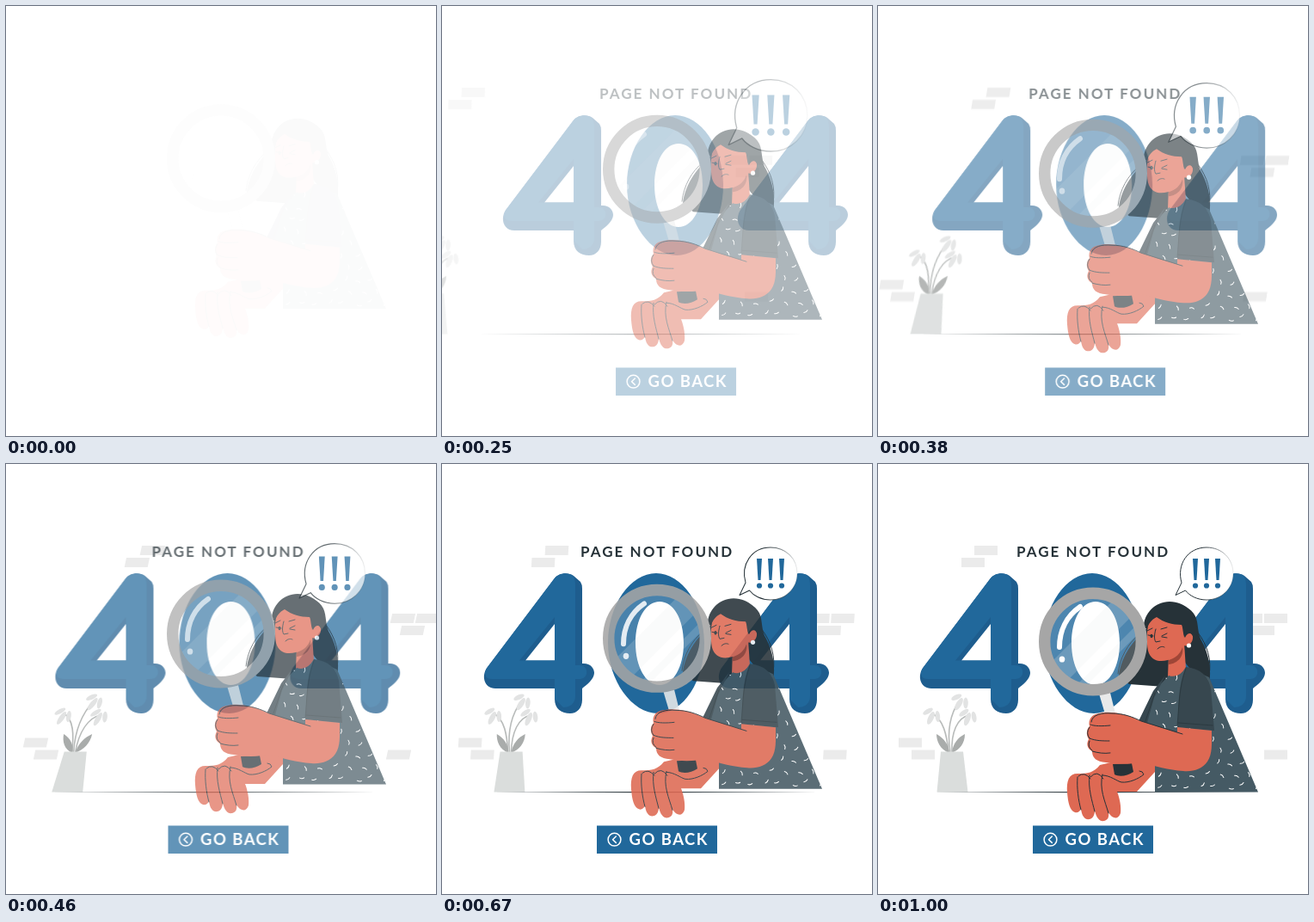
Recreate the animation shown at these times as an HTML page. Size 500 by 500 pixels, loop 1.04 s.

```html
<!DOCTYPE html>
<html lang="en">
<head>
<meta charset="utf-8">
<title>Page not found</title>
<style>
  html, body { margin: 0; width: 100%; height: 100%; overflow: hidden; background: #fff; }
  svg { display: block; width: 100%; height: 100%; }
  text { font-family: Lato, "Open Sans", sans-serif; font-weight: 700; }
  .line { fill: none; stroke: #263238; stroke-width: 1; stroke-linecap: round; stroke-linejoin: round; }
  .skin { fill: #de6953; }
  .hair { fill: #263238; }
  .white { fill: none; stroke: #fff; stroke-linecap: round; stroke-linejoin: round; }
</style>
</head>
<body>
<svg viewBox="0 0 500 500">
  <defs>
    <clipPath id="dressClip"><path d="M338 245L362 236L385 248L442 381.500H322V350L303 300L322 263Z"/></clipPath>
    <clipPath id="lensClip"><circle cx="250" cy="206.500" r="51"/></clipPath>
    <linearGradient id="bubbleLine"><stop offset=".45" stop-color="#263238"/><stop offset="1" stop-color="#263238" stop-opacity=".1"/></linearGradient>
    <g id="four">
      <path fill="#1e5d8e" fill-rule="evenodd" d="M131 261H62C49 261 45 246 53 236L130 134C136 126 147 126 153 130L161 137Q163 140 163 145V232C172 231 177 237 177 243C177 250 168 257 163 261V274C163 284 157 290 149 290C139 290 131 285 131 273ZM131 186L97 228.500H131Z"/>
      <path fill="#21689b" fill-rule="evenodd" d="M131 250H58C49 250 48 242 53 236L130 134C136 126 147 126 152 130Q155 134 155 141V234H160C171 234 171 250 160 250H155V270C155 279 148 283 141 283L131 273ZM131 178L90 228.500H131Z"/>
    </g>
    <g id="bloom">
      <ellipse cx="-5" cy="4" rx="2.800" ry="6.500" transform="rotate(35)"/>
      <ellipse cx="0" cy="6" rx="3.200" ry="8"/>
      <ellipse cx="5" cy="4" rx="2.800" ry="6.500" transform="rotate(-30)"/>
    </g>
  </defs>

  <g id="room">
    <g id="bricks" fill="#ebebeb"></g>
    <g fill="none" stroke="#b8bbba" stroke-width="1.600">
      <path d="M82 335C80 315 76 297 63 290"/>
      <path d="M84 335C80 310 84 290 95 275"/>
      <path d="M86 335C85 312 92 295 106 292"/>
    </g>
    <path fill="#a9acab" d="M83 336C72 332 68 322 68 314C77 319 82 326 83 336ZM86 336C87 325 93 318 101 314C101 325 95 332 86 336Z"/>
    <g fill="#e2e3e3">
      <use href="#bloom" transform="translate(64 290) rotate(25)"/>
      <use href="#bloom" transform="translate(97 274) rotate(30)"/>
      <use href="#bloom" transform="translate(106 291) rotate(20)"/>
    </g>
    <path fill="#dadddc" d="M73 334.500H99L104.500 381.500H68.500Z"/>
  </g>

  <path id="table" fill="#263238" d="M65 381.500L250 380.900L442 381.500L250 382.200Z"/>

  <g id="sign">
    <use href="#four"/>
    <use href="#four" x="273"/>
    <path fill="#21689b" fill-rule="evenodd" d="M249 127C279 127 305 164 305 208S281 290 251 290S193 252 193 208S219 127 249 127ZM253 160C237 160 225 180 225 208S237 257 253 257S281 236 281 208S269 160 253 160Z"/>
    <text x="161" y="108.300" font-size="17" letter-spacing="2.050" fill="#263238">PAGE NOT FOUND</text>
    <path fill="#21689b" d="M180 420.500H320V453H180Z"/>
    <circle cx="200.500" cy="436.700" r="7.400" class="white" stroke-width="1.500"/>
    <path d="M202.300 433L198.500 436.700L202.300 440.400" class="white" stroke-width="1.500"/>
    <text x="217.500" y="443.200" font-size="18.500" letter-spacing="1.450" fill="#fff">GO BACK</text>
  </g>

  <g id="woman">
    <path class="hair" d="M316 188C299 202 283 222 280 246L292 256L333 259L350 222L362 237L385 256C388 240 385 222 377 207C371 198 373 185 369 177C361 161 333 155 318 171C311 176 309 183 312 192Z"/>
    <path class="line" d="M304 198C290 209 281 226 279 244M372 196C383 211 388 227 385 246"/>

    <path class="skin" d="M338 220L356 208L358 238C352 249 344 251 337 248Z"/>
    <path fill="#9f4637" d="M338 228C346 226 352 220 354 213C356 223 349 232 338 233Z"/>
    <path class="skin" d="M316 180C312 192 312 206 314 217C317 228 326 231 337 228C346 225 352 217 355 211C365 214 369 200 364 197C360 194 357 198 356 202L354 182L326 176Z"/>
    <path class="hair" d="M309 190C309 174 322 160 339 160C358 160 369 174 371 190C372 199 369 204 367 204C366 195 360 195 357 202C354 197 355 191 353 187C342 187 332 184 324 178C318 181 314 186 313 192Z"/>
    <circle cx="361.500" cy="211" r="2.600" fill="#fff"/>
    <path class="line" d="M323 192C321 199 321 204 323 207L328 206M313 194L319 191M329 192L336 190M314 199L320 200M330 200L336 197M330 201L336 202M325 215C328 212 331 212 333 213"/>
    <ellipse cx="318" cy="200" rx="1.500" ry="2.300" class="hair"/>

    <path fill="#455a64" d="M338 246Q350 250 358 236L385 248L442 381.500H322V350L303 300L322 263Z"/>
    <g id="dashes" clip-path="url(#dressClip)" class="white" stroke-width="1"></g>
    <path fill="#37474f" d="M358 236C375 238 384 246 387 261L391 310L348 306C350 282 348 259 358 236ZM334 246L320 264L303 299L313 301L321 272Z"/>
    <path class="line" opacity=".6" d="M358 238C350 259 350 282 348 304M349 301L389 304M322 266L311 299"/>

    <path fill="#37474f" d="M272 346L294 342L297 357C296 363 277 366 275 360Z"/>
    <path class="skin" d="M258 350C251 359 244 360 232 360C222 360 219 368 220 382C221 394 223 403 229 405C232 406 235 404 236 401C237 410 241 414 246 413C250 412 252 408 252 403C254 412 258 416 263 415C267 414 269 411 268 405C273 414 280 413 282 406C283 399 281 388 278 381H301L322 358V337L284 344Z"/>
    <path fill="#263238" d="M273 349L295 348L297 358C290 363 280 364 275 361Z"/>
    <path class="line" d="M232 364C231 377 233 391 236 402M246 362C244 377 249 392 252 404M261 361C257 378 264 392 268 406M233 363Q240 357 247 366M247 364Q255 355 262 366M261 362C270 362 278 369 283 370C292 371 303 366 309 361Q308 357 304 357"/>

    <path fill="#e9eaea" d="M257 267L270 266L277 294H265Z"/>
    <g clip-path="url(#lensClip)">
      <circle cx="250" cy="206.500" r="51" fill="#fff" opacity=".2"/>
      <path fill="#e6e9ea" opacity=".2" d="M195 237L278 154L298 174L215 257ZM224 264L302 186L308 192L230 270Z"/>
    </g>
    <circle cx="250" cy="206.500" r="56.300" fill="none" stroke="#a6a6a6" stroke-width="13.400"/>
    <path class="white" stroke-width="6" d="M211 213C211 194 219 177 235 166"/>
    <ellipse cx="214" cy="227" rx="3.300" ry="3.600" fill="#fff"/>

    <path class="skin" d="M348 306L388 310C388 326 389 337 383 346C377 355 366 358 355 357C338 356 322 351 306 347C295 349 279 350 265 347C254 346 249 342 249 334C243 331 242 325 245 320C242 315 242 309 246 305C244 298 248 291 257 290C269 287 287 290 301 297C317 303 334 308 348 312Z"/>
    <path class="line" d="M247 303C251 305 261 305 270 304M246 319C253 322 261 322 269 322M249 334C256 336 263 337 270 336M248 300C249 291 261 289 272 290C285 290 296 294 306 299L354 314M246 306Q241 313 246 319M246 322Q243 329 249 333"/>
  </g>

  <g id="bubble">
    <path fill="#fff" stroke="url(#bubbleLine)" stroke-linejoin="round" d="M353 138C347 117 360 97 382 97C400 97 413 110 413 127.500C413 145 399 158 382 158C371 158 362 153 357.500 147L346 152.500Z"/>
    <g id="marks" fill="#21689b"></g>
  </g>
</svg>

<script>
  const LOOP = 1040, FRAME = 1000 / 24;
  const $ = id => document.getElementById(id);
  const repeat = (items, draw) => items.map(draw).join('');

  $('bricks').innerHTML = repeat(
    [[112, 95], [97, 109], [24, 318.500], [39, 332.500], [449, 332.500], [420, 174], [449, 174], [434, 188]],
    ([x, y]) => `<rect x="${x}" y="${y}" width="27" height="11"/>`);
  $('marks').innerHTML = repeat([369, 382, 395], x =>
    `<path d="M${x - 3} 110H${x + 3}L${x + 1.500} 135H${x - 1.500}Z"/><circle cx="${x}" cy="141.500" r="3.100"/>`);

  // Jittered lattice of short bent stitches
  let seed = 11;
  const random = () => (seed = seed * 16807 % 2147483647) / 2147483647;
  let stitches = '';
  for (let y = 246; y < 382; y += 14) {
    for (let x = 304 + y % 4 * 3; x < 442; x += 17) {
      const turn = random() * 180, px = x + random() * 7, py = y + random() * 6;
      stitches += `<path transform="translate(${px} ${py}) rotate(${turn})" d="M-2.500 0Q0 -1.200 2.500 .5"/>`;
    }
  }
  $('dashes').innerHTML = stitches;

  // Smooth curve through [time, value] keys, flat at turning points
  function curve(keys) {
    const slope = i => (keys[i + 1][1] - keys[i][1]) / (keys[i + 1][0] - keys[i][0]);
    const tangent = keys.map((_, i) => {
      if (i === 0) return slope(0);
      if (i === keys.length - 1) return 0;
      const a = slope(i - 1), b = slope(i);
      return a * b <= 0 ? 0 : 2 * a * b / (a + b);
    });
    return t => {
      let i = 0;
      while (i < keys.length - 2 && t > keys[i + 1][0]) i++;
      const [t0, v0] = keys[i], [t1, v1] = keys[i + 1];
      const d = t1 - t0, u = Math.min(1, (t - t0) / d), w = 1 - u;
      return w * w * ((1 + 2 * u) * v0 + u * d * tangent[i])
           + u * u * ((3 - 2 * u) * v1 - w * d * tangent[i + 1]);
    };
  }

  const clamp = v => Math.max(0, Math.min(1, v));
  const signShift = curve([[0, 30], [167, 26], [333, 17], [458, 8.500], [667, 0], [833, -2], [1000, 0]]);
  const roomShift = curve([[0, -330], [167, -175], [333, -29], [458, 15], [667, 0], [833, 0], [1000, 0]]);
  const roomSkew = curve([[0, .3], [167, .07], [333, -.12], [458, -.214], [667, -.057], [833, .018], [1000, 0]]);
  const roomFade = curve([[0, 0], [167, .06], [333, .75], [458, 1], [1000, 1]]);

  function place(id, transform, opacity) {
    $(id).setAttribute('transform', transform);
    $(id).setAttribute('opacity', opacity);
  }

  function render(ms) {
    const step = Math.floor((ms % LOOP + 5) / FRAME);
    const t = Math.min(step, 24) * FRAME;
    const rest = (1 - clamp((step + .3) / 25)) ** 2;
    const shift = signShift(t), skew = roomSkew(t);
    const signFade = clamp((t - 90) / 520);

    place('room', `matrix(1 0 ${skew} 1 ${roomShift(t) - skew * 240} 0)`, roomFade(t));
    place('table', `translate(${-40 * rest})`, signFade);
    place('sign', `translate(${shift})`, signFade);
    place('woman', `translate(0 ${-30 * rest})`, 1 - rest);
    place('bubble', `translate(381 128) scale(${1 + shift / 60}) translate(-381 -128)`, signFade);
  }

  const start = performance.now();
  function tick(now) {
    render(Math.max(0, now - start));
    requestAnimationFrame(tick);
  }
  render(0);
  requestAnimationFrame(tick);
</script>
</body>
</html>
```
